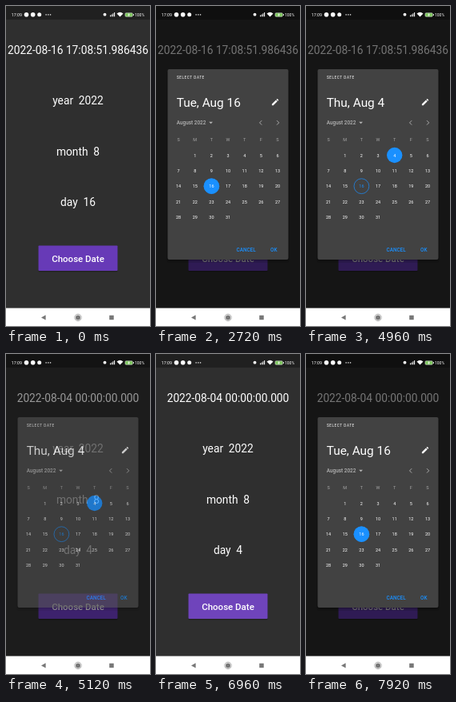
Write an HTML page that moves like this. It is 180 px wide and 400 px high and loops after 8 s.

```html
<!DOCTYPE html>
<html lang="en">
<head>
<meta charset="utf-8">
<title>Date picker</title>
<style>
html, body { margin: 0; width: 100%; height: 100%; overflow: hidden; background: #303030; }
svg { display: block; width: 100%; height: 100%; }
text { font-family: Roboto, sans-serif; fill: #fff; white-space: pre; }
.mid { text-anchor: middle; }
.main { font-size: 13.75px; }
.medium { font-weight: 500; }
.blue { fill: #1a90ff; }
</style>
</head>
<body>
<svg viewBox="0 0 180 400">
  <rect width="180" height="400" fill="#2f2f2f"/>
  <rect width="180" height="17" fill="#202020"/>
  <g class="main mid">
    <text id="stamp" x="90" y="60"></text>
    <text x="90" y="123">year  2022</text>
    <text x="90" y="186.5">month  8</text>
    <text id="day" x="90" y="249.5"></text>
  </g>
  <rect x="40.5" y="300.5" width="99" height="32" rx="1" fill="#000" opacity=".25"/>
  <rect x="40.5" y="299.5" width="99" height="31.5" rx="1" fill="#673ab7"/>
  <rect id="press" x="40.5" y="299.5" width="99" height="31.5" rx="1" fill="#fff"/>
  <text class="mid medium" x="90" y="319.6" font-size="11.5">Choose Date</text>

  <g id="dialog">
    <rect width="180" height="378" opacity=".54"/>
    <rect x="13" y="80" width="154" height="241" rx="4" opacity=".12"/>
    <rect x="14" y="79" width="152" height="239.5" rx="3" opacity=".2"/>
    <rect x="14.5" y="79" width="151" height="238" rx="2" fill="#424242"/>
    <text x="26" y="90.6" font-size="4.6" letter-spacing=".6">SELECT DATE</text>
    <text id="heading" x="25.7" y="126" font-size="15.4"></text>
    <path transform="translate(143.5 114.7) scale(.459)" fill="#fff" d="M3 17.25V21h3.75L17.81 9.94l-3.75-3.75zM20.71 7.04c.39-.39.39-1.02 0-1.41l-2.34-2.34c-.39-.39-1.02-.39-1.41 0l-1.83 1.83 3.75 3.75z"/>
    <text class="medium" x="25.8" y="148.3" font-size="6.4" style="fill:#b5b5b5">August 2022</text>
    <path d="M66.2 144.8h4.8l-2.4 2.4z" fill="#b5b5b5"/>
    <path d="M132.2 143.2l-2.7 2.7 2.7 2.7M151 143.2l2.7 2.7-2.7 2.7" fill="none" stroke="#b5b5b5" stroke-width=".9"/>
    <circle id="today" r="9.4" fill="none" stroke="#1a90ff" stroke-width=".7"/>
    <circle id="chosen" class="blue" r="9.7"/>
    <g id="grid" class="mid" font-size="5.5"></g>
    <g class="mid medium" font-size="6.4">
      <text class="blue" x="112.6" y="306.8">CANCEL</text>
      <text class="blue" x="147.2" y="306.8">OK</text>
    </g>
  </g>

  <g fill="#fff">
    <text x="6.8" y="12.7" font-size="5.3">17:09</text>
    <circle cx="25.5" cy="10.7" r="2.8"/>
    <circle cx="33.7" cy="10.7" r="2.8"/>
    <circle cx="41.7" cy="10.7" r="2.5"/>
    <path d="M49.5 10.2h1.3v1.2h-1.3zM52.2 10.2h1.3v1.2h-1.3zM54.9 10.2h1.3v1.2h-1.3z"/>
    <circle cx="123.5" cy="10.7" r="1.9"/>
    <path d="M130 11.5h1v1.8h-1zM131.7 10.4h1v2.9h-1zM133.4 9.2h1v4.1h-1zM135.1 8h1v5.3h-1z"/>
    <path d="M138.5 9.4q4-3.4 8 0l-4 4.2z"/>
    <rect x="149" y="8.8" width="9.2" height="4.4" rx="1" fill="#78c657" stroke="#ddd" stroke-width=".6"/>
    <path d="M159 10h.8v2h-.8zM154 8.6l-2 2.8h1.5l-.6 2.2 2.2-3h-1.6z"/>
    <text x="161" y="12.7" font-size="5">100%</text>
  </g>

  <rect y="377.6" width="180" height="22.4" fill="#fff"/>
  <g fill="#777">
    <path d="M44 389.4l5.6-3.2v6.4z"/>
    <circle cx="90" cy="389.4" r="3"/>
    <circle cx="90" cy="389.4" r="4.2" fill="none" stroke="#888" stroke-width=".7"/>
    <rect x="129.2" y="386.7" width="5.5" height="5.5"/>
  </g>
</svg>
<script>
const LOOP = 8000, STEP = 80;
const OPEN = 2720, PICK = 3760, CLOSE = 5120, PRESS = 6800, REOPEN = 7120;
const FIRST_COL = 28.1, COL = 20.65, FIRST_ROW = 186.5, ROW = 19.35;

const $ = id => document.getElementById(id);
const clamp = v => Math.max(0, Math.min(1, v));
const colX = c => FIRST_COL + c * COL;
const place = day => [colX(day % 7), FIRST_ROW + Math.floor(day / 7) * ROW];

function addText(label, x, y, color) {
  const el = document.createElementNS('http://www.w3.org/2000/svg', 'text');
  el.setAttribute('x', x);
  el.setAttribute('y', y + 2);
  el.style.fill = color;
  el.textContent = label;
  $('grid').append(el);
  return el;
}

[...'SMTWTFS'].forEach((name, c) => addText(name, colX(c), 167.2, '#a6a6a6'));
const days = [];
for (let d = 1; d <= 31; d++) days[d] = addText(d, ...place(d), '#fff');

function moveTo(circle, day) {
  const [x, y] = place(day);
  circle.setAttribute('cx', x);
  circle.setAttribute('cy', y);
}
moveTo($('today'), 16);

function dialogAlpha(t) {
  if (t < OPEN) return 0;
  if (t < CLOSE) return 1;
  if (t < REOPEN) return clamp((CLOSE + 180 - t) / 240);
  return clamp((t - REOPEN + STEP) / 240);
}

function render(time) {
  const t = Math.floor(time % LOOP / STEP) * STEP;
  const done = t >= CLOSE;
  const picked = t >= PICK && t < REOPEN;
  const alpha = dialogAlpha(t);

  $('stamp').textContent = done ? '2022-08-04 00:00:00.000' : '2022-08-16 17:08:51.986436';
  $('day').textContent = 'day  ' + (done ? 4 : 16);
  $('press').setAttribute('opacity', t >= PRESS ? .05 * clamp((t - PRESS + STEP) / 240) * (1 - alpha) : 0);

  $('dialog').setAttribute('opacity', alpha);
  $('heading').textContent = picked ? 'Thu, Aug 4' : 'Tue, Aug 16';
  moveTo($('chosen'), picked ? 4 : 16);
  days[16].style.fill = picked ? '#1a90ff' : '#fff';
}

const start = performance.now();
function tick() {
  render(performance.now() - start);
  requestAnimationFrame(tick);
}
tick();
</script>
</body>
</html>
```
